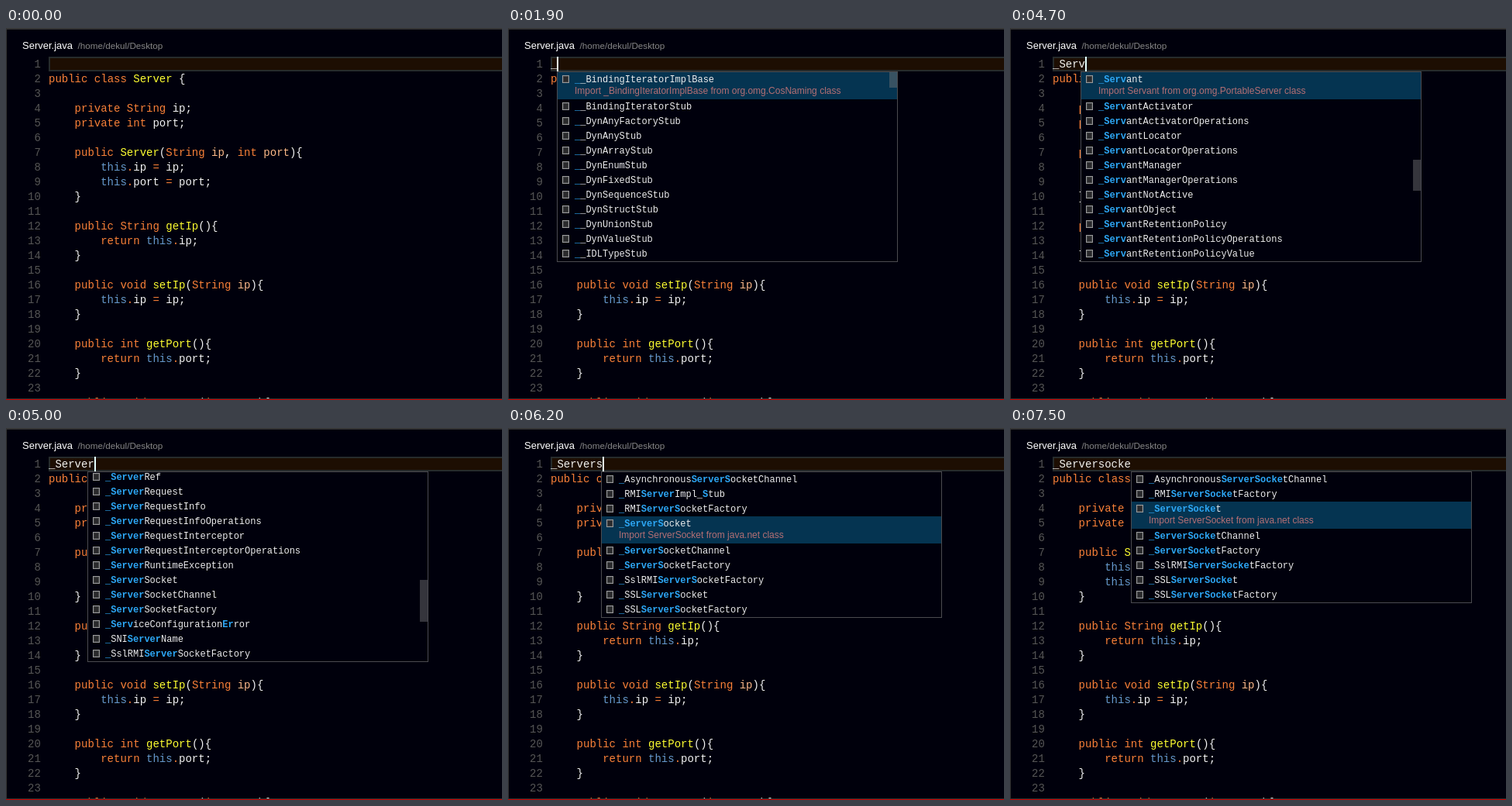
Recreate the animation shown at these times as an HTML page. Size 640 px wide and 480 px high, loop 8 s.

```html
<!DOCTYPE html>
<html lang="en">
<head>
<meta charset="utf-8">
<title>Code completion</title>
<style>
  html, body { margin: 0; width: 100%; height: 100%; overflow: hidden; background: #00000c; }
  svg { display: block; width: 640px; height: 480px; }
  text { white-space: pre; }
  .code { font: 14px "Liberation Mono", "Noto Sans Mono", monospace; fill: #f2f2f2; }
  .item { font: 12px "Liberation Mono", "Noto Sans Mono", monospace; fill: #ececec; }
  .hit { font-weight: 700; fill: #2da7f5; }
  .ui { font-family: "Liberation Sans", Arial, sans-serif; }
  .num { fill: #555; }
  .key { fill: #fa8038; }
  .name { fill: #ffff30; }
  .self { fill: #6699cc; }
  .arg { fill: #fdb988; }
</style>
</head>
<body>
<svg viewBox="0 0 640 480">
  <defs>
    <clipPath id="page"><rect width="640" height="478"/></clipPath>
    <clipPath id="inner"><rect id="innerBox" x="1" y="57" width="438"/></clipPath>
  </defs>
  <rect width="640" height="480" fill="#00000c"/>
  <text class="ui" x="21" y="27" font-size="13" fill="#fff">Server.java</text>
  <text class="ui" x="92.5" y="27" font-size="11.7" fill="#858585">/home/dekul/Desktop</text>
  <rect x="56" y="38" width="600" height="17" fill="#1d0e02" stroke="#262b2c" stroke-width="2"/>
  <g id="code" class="code" clip-path="url(#page)"></g>
  <text id="typed" class="code" x="55" y="51"></text>
  <rect id="caret" y="37" width="2" height="19" fill="#e4ffff"/>
  <path d="M0 1H640" stroke="#343434" stroke-width="2"/>
  <path d="M.5 0V480M0 478.5H640" stroke="#343434"/>
  <path d="M0 479.5H640" stroke="#c80000"/>
  <g id="popup">
    <rect id="frame" x=".5" y="56.5" width="439" fill="#00000c" stroke="#4b4b4f"/>
    <g id="rows" clip-path="url(#inner)"></g>
  </g>
</svg>
<script>
const $ = id => document.getElementById(id);
const span = (cls, s) => `<tspan class="${cls}">${s}</tspan>`;

const source = `
public class Server {

    private String ip;
    private int port;

    public Server(String ip, int port){
        this.ip = ip;
        this.port = port;
    }

    public String getIp(){
        return this.ip;
    }

    public void setIp(String ip){
        this.ip = ip;
    }

    public int getPort(){
        return this.port;
    }

    public void setPort(int port){`.split("\n");

const token = /\b(public|class|private|return|void|int|String)\b|\b(this)\b|(\w+(?=\()|Server)|((?<=[(,] ?(?:String|int) )\w+)|([.=])/g;

const paint = line => line.replace(token, (s, key, self, name, arg) =>
  span(self ? "self" : name ? "name" : arg ? "arg" : "key", s));

$("code").innerHTML = source.map((line, i) => {
  const y = 51 + 19 * i;
  return `<text class="num" x="44.8" y="${y}" text-anchor="end">${i + 1}</text>` +
    `<text x="55" y="${y}">${paint(line)}</text>`;
}).join("");

// Each list: names, selected row, its package, scroll thumb [top, height], row offset
const list = (names, sel, pack, thumb, shift = 0) =>
  ({ names: names.split(" "), sel, pack, thumb, shift });

const servants = "Servant ServantActivator ServantActivatorOperations ServantLocator " +
  "ServantLocatorOperations ServantManager ServantManagerOperations ServantNotActive ServantObject";
const servers = "ServerRef ServerRequest ServerRequestInfo ServerRequestInfoOperations " +
  "ServerRequestInterceptor ServerRequestInterceptorOperations ServerRuntimeException " +
  "ServerSocket ServerSocketChannel ServerSocketFactory ServiceConfigurationError SNIServerName";
const sockets = "RMIServerSocketFactory ServerSocket ServerSocketChannel ServerSocketFactory " +
  "SslRMIServerSocketFactory SSLServerSocket SSLServerSocketFactory";

const lists = {
  stubs: list("_BindingIteratorImplBase _BindingIteratorStub _DynAnyFactoryStub _DynAnyStub " +
    "_DynArrayStub _DynEnumStub _DynFixedStub _DynSequenceStub _DynStructStub _DynUnionStub " +
    "_DynValueStub _IDLTypeStub", 0, "org.omg.CosNaming", [57, 20]),
  s: list("SAAJMetaFactory SAAJResult SafeVarargs SampleModel Sasl SaslClient SaslClientFactory " +
    "SaslException SaslServer SaslServerFactory Savepoint SAXException", 0, "javax.xml.soap", [81, 20]),
  ser: list("SerialRef SerialStruct " + servants + " ServantRetentionPolicy",
    0, "javax.sql.rowset.serial", [150, 30]),
  serv: list(servants + " ServantRetentionPolicy ServantRetentionPolicyOperations ServantRetentionPolicyValue",
    0, "org.omg.PortableServer", [170, 40]),
  scroll: list(servers + " SslRMIServerSocketFactory", -1, "", [196, 54], -3),
  server: list(servers, 0, "java.rmi.server", [196, 54]),
  servers: list("AsynchronousServerSocketChannel RMIServerImpl_Stub " + sockets, 3, "java.net"),
  socket: list("AsynchronousServerSocketChannel " + sockets, 2, "java.net")
};

// Longest prefix of the query first, then the rest at its last place
function mark(name, query) {
  const low = name.toLowerCase(), q = query.toLowerCase();
  const on = new Set();
  let n = q.length;
  while (n && low.indexOf(q.slice(0, n)) < 0) n--;
  const add = (at, len) => { for (let i = 0; i < len; i++) on.add(at + i); };
  if (n) add(low.indexOf(q.slice(0, n)), n);
  if (n < q.length) add(low.lastIndexOf(q.slice(n)), q.length - n);
  let out = "", run = "", hot = true;
  const flush = () => { if (run) out += hot ? span("hit", run) : run; run = ""; };
  ["_", ...name].forEach((c, i) => {
    const hit = i === 0 || on.has(i - 1);
    if (hit !== hot) { flush(); hot = hit; }
    run += c;
  });
  flush();
  return out;
}

function row(name, y, query, pack) {
  const picked = pack ? `<rect x="1" y="${y}" width="438" height="35" fill="#053451"/>` +
    `<text class="ui" x="23" y="${y + 28}" font-size="12" fill="#b46f74">Import ${name} from ${pack} class</text>` : "";
  return picked +
    `<rect x="7.5" y="${y + 4.5}" width="8" height="9" fill="#2a2a2c" stroke="#9a9a9a"/>` +
    `<rect x="8.5" y="${y + 5.5}" width="6" height="7" fill="none" stroke="#55585a" stroke-dasharray="1"/>` +
    `<text class="item" x="23" y="${y + 13}">${mark(name, query)}</text>`;
}

function drawPopup(id, query) {
  const l = lists[id];
  const height = Math.min(244, l.names.length * 19 + (l.sel < 0 ? 0 : 16));
  let y = 57 + l.shift, html = "";
  l.names.forEach((name, i) => {
    const picked = i === l.sel;
    html += row(name, y, query, picked && l.pack);
    y += picked ? 35 : 19;
  });
  if (l.thumb) html += `<rect x="429" y="${l.thumb[0]}" width="10" height="${l.thumb[1]}" fill="#777" fill-opacity=".45"/>`;
  $("rows").innerHTML = html;
  $("frame").setAttribute("height", height + 1);
  $("innerBox").setAttribute("height", height);
}

// [ms, typed letters, caret on, list, popup x, popup opacity]
const word = "_Serversocke";
const steps = [
  [0, 0, 0], [500, 0, 1], [900, 1, 1],
  [1300, 1, 1, "stubs", 63, .35], [1400, 1, 0, "stubs", 63, .75], [1500, 1, 0, "stubs", 63],
  [1900, 1, 1, "stubs", 63], [2500, 1, 0, "stubs", 63], [2900, 1, 1, "stubs", 63],
  [3800, 2, 1, "s", 63], [3900, 3, 1, "s", 63], [4100, 4, 1, "ser", 89],
  [4700, 5, 1, "serv", 91], [4900, 6, 1, "serv", 97], [5000, 7, 1, "scroll", 105],
  [5100, 7, 1, "server", 114], [5500, 7, 0, "server", 114],
  [6200, 8, 1, "servers", 120], [6300, 8, 1, "servers", 122],
  [6400, 9, 1, "socket", 127], [6500, 9, 1, "socket", 131],
  [6600, 10, 1, "socket", 133], [6700, 10, 1, "socket", 139],
  [6900, 11, 1, "socket", 144], [7000, 12, 1, "socket", 150],
  [7100, 12, 1, "socket", 156], [7500, 12, 0, "socket", 156]
];

let shown;
function render(ms) {
  const step = steps.findLast(s => s[0] <= ms);
  if (step === shown) return;
  shown = step;
  const [, count, caret, id, x, opacity = 1] = step;
  $("typed").textContent = word.slice(0, count);
  $("caret").setAttribute("x", 55 + Math.round(8.4 * count));
  $("caret").setAttribute("visibility", caret ? "visible" : "hidden");
  $("popup").setAttribute("visibility", id ? "visible" : "hidden");
  if (!id) return;
  $("popup").setAttribute("transform", `translate(${x})`);
  $("popup").setAttribute("opacity", opacity);
  drawPopup(id, id === "serv" ? "Serv" : id === "s" ? "S" : word.slice(1, count));
}

const start = performance.now();
function tick() {
  render((performance.now() - start) % 8000);
  requestAnimationFrame(tick);
}
tick();
</script>
</body>
</html>
```
